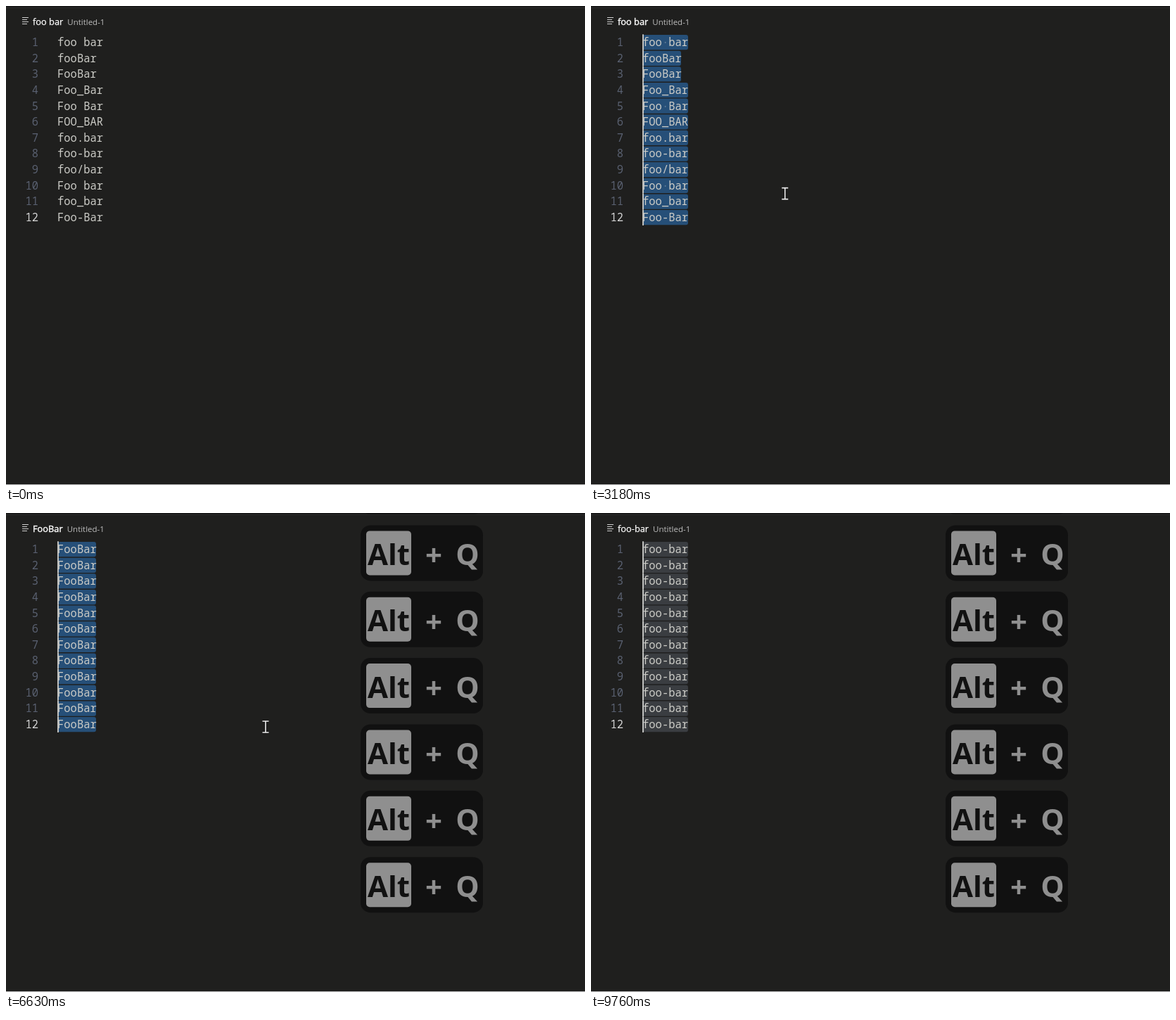
These frames come from a looping animation (823x681 px, 9.84 s). An HTML page with a canvas:

```html
<!DOCTYPE html>
<html lang="en">
<head>
<meta charset="utf-8">
<style>
html, body { margin: 0; width: 100%; height: 100%; overflow: hidden; background: #1f1f1e; }
canvas { display: block; }
</style>
</head>
<body>
<canvas id="stage" width="823" height="681"></canvas>
<script>
const g = document.getElementById('stage').getContext('2d');
const LOOP = 9840, LEFT = 73, TOP = 40.3, ROW = 22.64, CHAR = 9.3;
const MONO = '15.5px "Noto Sans Mono", monospace';
const UI = '"Open Sans", "Noto Sans", sans-serif';
const FOCUS = 140, DRAG = 1080, RELEASE = 1790, BLUR = 9755;

const words = ['foo bar', 'fooBar', 'FooBar', 'Foo_Bar', 'Foo Bar', 'FOO_BAR',
  'foo.bar', 'foo-bar', 'foo/bar', 'Foo bar', 'foo_bar', 'Foo-Bar'];
const edits = [[4280, 'fooBar'], [4820, 'FooBar'], [4980, 'FOO_BAR'], [5370, 'foo_bar'],
  [5840, 'foo-bar'], [6160, 'fooBar'], [6630, 'FooBar'], [6860, 'FOO_BAR'], [7250, 'foo-bar']];
// moments from which the caret rests before blinking
const rests = [1920, ...edits.slice(0, -1).map(e => e[0]), 7120];

// pointer path: time, x, y
const path = [[140, 635, 546], [900, 147, 303], [1080, 140, 301], [1530, 88, 52],
  [1620, 87, 52], [1720, 68, 43], [1800, 68, 43], [2090, 269.5, 257], [2170, 269.5, 261],
  [3100, 269.5, 261], [3180, 275.5, 266.5], [3560, 369, 304], [7520, 369, 304],
  [7800, 700, 561.5], [8190, 812, 561], [8300, 812, 561], [8850, 806, 692]];

function pointer(t) {
  const i = path.findIndex(p => p[0] > t);
  if (i < 1) return null;
  const [a, b] = [path[i - 1], path[i]];
  const k = (t - a[0]) / (b[0] - a[0]);
  return { x: a[1] + (b[1] - a[1]) * k, y: a[2] + (b[2] - a[2]) * k };
}

function box(x, y, w, h, r, color) {
  g.fillStyle = color;
  g.beginPath();
  g.roundRect(x, y, w, h, r);
  g.fill();
}

function label(s, x, y, font, color, align = 'left') {
  g.font = font;
  g.fillStyle = color;
  g.textAlign = align;
  g.fillText(s, x, y);
}

function caretAlpha(t) {
  if (t < rests[0] || t >= BLUR) return 1;
  const phase = t - rests.filter(r => r <= t).pop() - 430;
  if (phase < 0) return 1;
  const p = phase % 1000;
  if (p < 210) return 1 - p / 210;
  return Math.min(1, Math.max(0, (p - 480) / 220));
}

function header(title, focused) {
  g.fillStyle = '#191919';
  g.fillRect(0, 0, 823, 2);
  g.fillStyle = '#2a2a2a';
  g.fillRect(0, 2, 823, 1);
  g.fillStyle = '#c4c4c4';
  g.fillRect(0, 680, 823, 1);
  g.fillStyle = '#d0d0d0';
  [9, 7, 9, 7].forEach((w, i) => g.fillRect(23, 16 + i * 3, w, 1));
  label(title, 38, 26.5, '12.8px ' + UI, '#fff');
  const end = 38 + g.measureText(title).width;
  g.strokeStyle = '#fff';
  g.lineWidth = focused ? 0.4 : 0.25;
  g.strokeText(title, 38, 26.5);
  label('Untitled-1', end + 6, 26.5, '11.5px ' + UI, '#bcbcbc');
}

function editor(t, lines, at) {
  let col = 0, first = 0;
  if (t < RELEASE && at) {
    col = Math.max(0, Math.round((at.x - LEFT) / CHAR));
    first = Math.min(11, Math.max(0, Math.floor((at.y - TOP) / ROW)));
  }
  const selecting = t >= DRAG;
  if (!selecting) { col = 7; first = 11; }
  const fill = t >= BLUR ? '#3a3d41' : '#264f78';
  lines.forEach((s, i) => {
    const y = TOP + i * ROW, base = y + 16.7;
    const start = Math.min(col, s.length);
    const x = Math.floor(LEFT + start * CHAR), end = Math.floor(LEFT + s.length * CHAR);
    const active = i >= first;
    if (selecting && active && start < s.length)
      box(x, y + 0.7, end - x, ROW - 1.4, 3, fill);
    label(i + 1, 46, base, MONO, i === 11 ? '#d4d4d4' : '#596070', 'right');
    label(s, LEFT, base, MONO, '#cbcbc6');
    const gap = s.indexOf(' ');
    if (selecting && active && gap >= start)
      label('·', LEFT + gap * CHAR, base, MONO, 'rgba(227,228,226,.3)');
    if (active && t >= FOCUS) {
      g.globalAlpha = caretAlpha(t);
      g.fillStyle = '#bfc0be';
      g.fillRect(x, y, 2, ROW);
      g.globalAlpha = 1;
    }
  });
}

function shortcut(y) {
  const font = 'bold 42px ' + UI, gray = '#8f8f8f', dark = '#111';
  box(504, y, 174, 79, 14, dark);
  box(512, y + 8, 64, 63, 5, gray);
  label('Alt', 544, y + 56.5, font, dark, 'center');
  label('+', 608, y + 58, font, gray, 'center');
  label('Q', 656, y + 56.5, font, gray, 'center');
}

function mouse(t, { x, y }) {
  if (t >= DRAG && t < RELEASE) {
    g.fillStyle = 'rgba(15,185,175,.75)';
    g.beginPath();
    g.arc(x - 1, y, 12, 0, 7);
    g.fill();
  }
  const beam = () => {
    g.beginPath();
    for (const s of [-1, 1]) {
      g.moveTo(x - 4.5, y + s * 8);
      g.lineTo(x + 4.5, y + s * 8);
    }
    g.moveTo(x, y - 8);
    g.lineTo(x, y + 8);
    g.stroke();
  };
  g.strokeStyle = '#111';
  g.lineWidth = 3;
  beam();
  g.strokeStyle = '#f0f0f0';
  g.lineWidth = 1.6;
  beam();
}

function draw(t) {
  g.fillStyle = '#1f1f1e';
  g.fillRect(0, 0, 823, 681);
  const done = edits.filter(e => e[0] <= t);
  const lines = done.length ? words.map(() => done[done.length - 1][1]) : words;
  const at = pointer(t);
  header(lines[0], t >= FOCUS && t < BLUR);
  editor(t, lines, at);
  done.slice(0, 7).forEach((_, i) => shortcut(489.2 - i * 94.36));
  if (at) mouse(t, at);
}

const begin = performance.now();
function tick() {
  draw((performance.now() - begin) % LOOP);
  requestAnimationFrame(tick);
}
tick();
</script>
</body>
</html>
```
